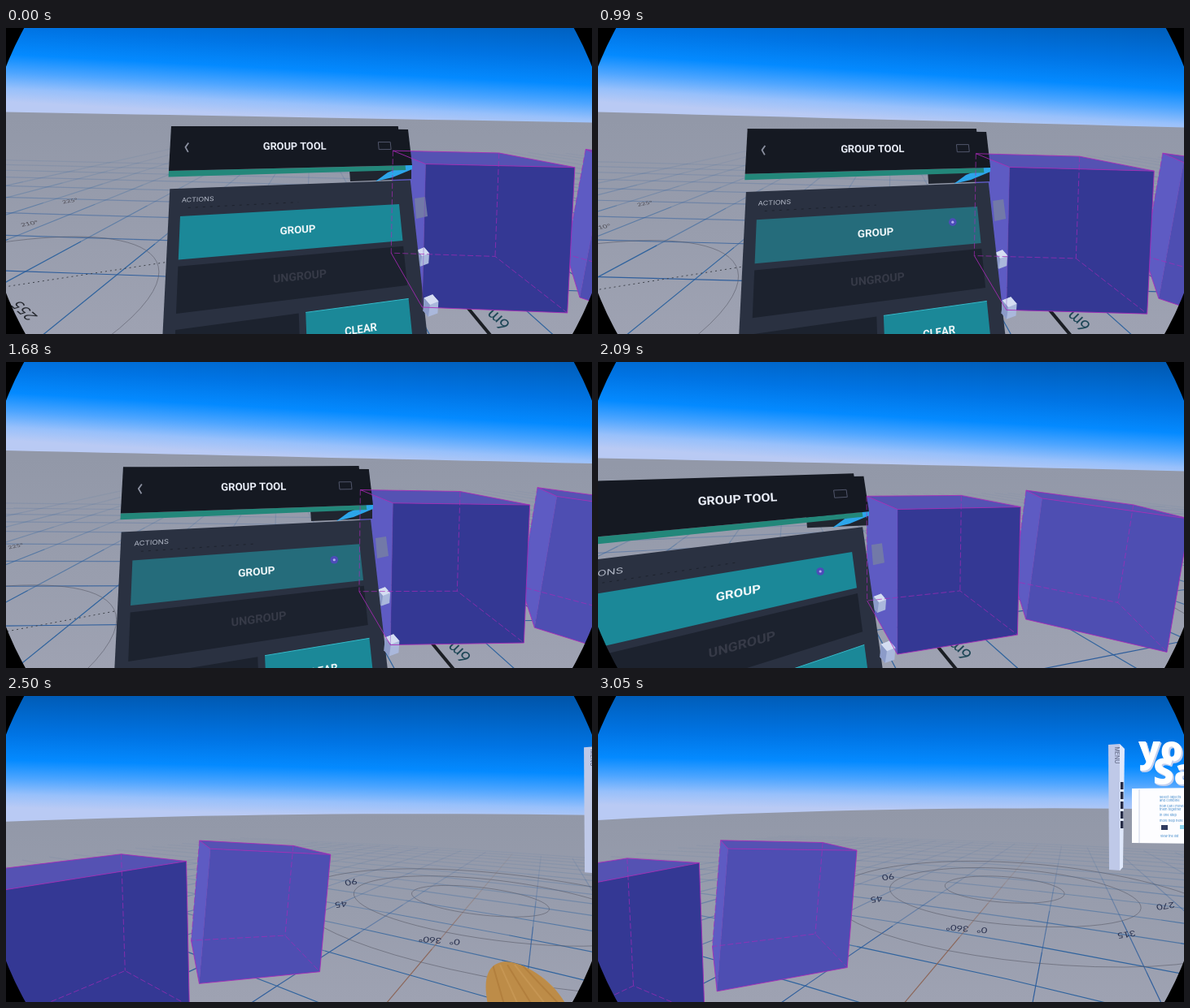
Recreate the animation shown at these times as an HTML page with a canvas. Size 720 by 377 pixels, loop 3.1 s.

```html
<!DOCTYPE html>
<html lang="en">
<head>
<meta charset="utf-8">
<title>Group tool</title>
<style>
html, body { margin: 0; width: 100%; height: 100%; overflow: hidden; background: #000; }
canvas { display: block; width: 720px; height: 377px; }
</style>
</head>
<body>
<canvas id="stage" width="720" height="377"></canvas>
<script>
const g = document.getElementById('stage').getContext('2d');
const LOOP = 3100, FOCAL = 410, EYE = 1.9, RAD = Math.PI / 180;

// camera path: time, near cube right and ahead of the eye, turn in degrees, horizon, tilt
const PATH = [
  [0, 1.415, 2.77, -2, 110, 13],
  [400, 1.41, 2.778, -1.4, 107, 14],
  [990, 1.345, 2.795, 0, 113, 19],
  [1680, 1.145, 2.843, 3.7, 117, 16],
  [2090, 0.395, 2.893, 17.4, 126, 16],
  [2500, -1.459, 2.167, 53.5, 146, -8],
  [3050, -1.911, 1.941, 62, 140, -13]
];
// boxes stand on the floor plan; units are one cube height
const NEAR = { x: 0, z: 0, turn: 0, top: 0.31, lean: 0 };
const FAR = { x: 1.43, z: -0.3, turn: -32, top: 0.25, lean: 0.1 };
const GRID = 1.11, HUB = [7.5, -1.18];
const HEAD = [[203, 122], [494, 126], [499, 170], [200, 177]];
const BODY = [[214, 233], [483, 218], [493, 318], [209, 353]];

const clamp = (v, a, b) => Math.max(a, Math.min(b, v));

// monotone cubic through the path
function pose(t) {
  const n = PATH.length - 1;
  if (t >= PATH[n][0]) return PATH[n];
  let k = 0;
  while (t >= PATH[k + 1][0]) k++;
  const step = i => PATH[i + 1][0] - PATH[i][0];
  const h = step(k), s = (t - PATH[k][0]) / h, r = 1 - s;
  return PATH[k].map((p, j) => {
    const rate = i => (PATH[i + 1][j] - PATH[i][j]) / step(i);
    const slope = i => {
      if (i === 0) return rate(0);
      if (i === n) return rate(n - 1);
      const a = rate(i - 1), b = rate(i);
      return a * b <= 0 ? 0 : 2 * a * b / (a + b);
    };
    const q = PATH[k + 1][j];
    return r * r * (1 + 2 * s) * p + s * s * (3 - 2 * s) * q
      + h * s * r * (r * slope(k) - s * slope(k + 1));
  });
}

function spin(x, z, deg) {
  const c = Math.cos(deg * RAD), s = Math.sin(deg * RAD);
  return [x * c - z * s, x * s + z * c];
}

function makeView(t) {
  const [, ox, oz, turn, mid, tilt] = pose(t);
  const bend = 6 * (turn / 60) ** 2;
  const horizon = x => {
    const k = clamp(x, -300, 1020) / 360 - 1;
    return mid + tilt * k / 2 + bend * k * k;
  };
  const toEye = (x, z) => {
    const p = spin(x, z, turn);
    return [p[0] + ox, p[1] + oz];
  };
  const shoot = ([x, z], drop = EYE) => {
    const px = 360 + FOCAL * x / z;
    return [px, horizon(px) + FOCAL * drop / z];
  };
  return { turn, mid, tilt, horizon, toEye, shoot };
}

function trace(pts, close) {
  g.beginPath();
  pts.forEach(p => g.lineTo(p[0], p[1]));
  if (close) g.closePath();
}
function fill(pts, color) {
  trace(pts, true);
  g.fillStyle = color;
  g.fill();
}
function stroke(pts, color, width, close) {
  trace(pts, close);
  g.strokeStyle = color;
  g.lineWidth = width;
  g.stroke();
}
function disc(x, y, r, color) {
  g.beginPath();
  g.arc(x, y, r, 0, 7);
  g.fillStyle = color;
  g.fill();
}
function write(str, x, y, font, color, angle = 0, squash = 1) {
  g.save();
  g.translate(x, y);
  g.scale(1, squash);
  g.rotate(angle);
  g.font = font;
  g.fillStyle = color;
  g.fillText(str, 0, 0);
  g.restore();
}

function drawSky({ mid, tilt }) {
  const k = tilt / 720 + 0.035;
  const sky = g.createLinearGradient(360, mid, 360 + 150 * k, mid - 150);
  [[0, '#b9caf4'], [0.11, '#97c0fb'], [0.24, '#4da5ff'], [0.39, '#048aff'], [0.6, '#0074e4'], [1, '#0056ac']]
    .forEach(s => sky.addColorStop(...s));
  g.fillStyle = sky;
  g.fillRect(0, 0, 720, 377);
}

function floorLine(view, a, b, color, width) {
  let p = view.toEye(...a), q = view.toEye(...b);
  const near = 0.5;
  if (p[1] > q[1]) [p, q] = [q, p];
  if (q[1] < near) return;
  if (p[1] < near) {
    const k = (near - p[1]) / (q[1] - p[1]);
    p = [p[0] + (q[0] - p[0]) * k, near];
  }
  g.globalAlpha = Math.min(0.95, 18 / ((p[1] + q[1]) / 2) ** 2);
  stroke([view.shoot(p), view.shoot(q)], color, width);
  g.globalAlpha = 1;
}

function floorRing(view, [cx, cz], rad) {
  g.beginPath();
  let pen = false;
  for (let a = 0; a <= 360; a += 5) {
    const [dx, dz] = spin(rad, 0, a), p = view.toEye(cx + dx, cz + dz);
    const seen = p[1] > 0.6;
    if (seen) g[pen ? 'lineTo' : 'moveTo'](...view.shoot(p));
    pen = seen;
  }
  g.strokeStyle = 'rgba(90,92,105,.6)';
  g.lineWidth = 1;
  g.stroke();
}

function floorText(view, str, x, z, size, color, angle, squash) {
  const p = view.toEye(x, z);
  if (p[1] > 1) write(str, ...view.shoot(p), `${size}px Lato, sans-serif`, color, angle, squash);
}

function drawFloor(view) {
  const shade = g.createLinearGradient(0, view.mid, 0, 377);
  shade.addColorStop(0, '#9298a8');
  shade.addColorStop(1, '#9ea2b2');
  const edge = [[720, 377], [0, 377]];
  for (let x = 0; x <= 720; x += 40) edge.push([x, view.horizon(x)]);
  fill(edge, shade);

  for (let i = -15; i <= 10; i++) {
    const x = HUB[0] + i * GRID, z = HUB[1] + i * GRID;
    for (let j = -16; j < 18; j += 2) {
      floorLine(view, [x, j], [x, j + 2], '#2a609d', 1.2);
      floorLine(view, [j, z], [j + 2, z], i ? '#2a5b9b' : '#8c6455', 1.2);
    }
  }
  for (let k = 1; k <= 3; k++) floorRing(view, HUB, k * 1.34);
  floorRing(view, [-4.78, 0.39], 1.8);
  g.setLineDash([2, 4]);
  floorLine(view, [-4.6, 0.7], [-2.6, 1.7], '#3c4048', 1);
  g.setLineDash([]);

  for (let k = -2; k <= 2; k++) {
    const [dx, dz] = spin(-3.1, 0, k * 45);
    const str = k ? String(k > 0 ? 360 - 45 * k : -45 * k) : '0°   360°';
    floorText(view, str, HUB[0] + dx, HUB[1] + dz, 13, '#28304e', k ? 2.95 : 3.25, 0.75);
  }
  floorText(view, '225°', -6.5, 4.2, 9, '#4c4a52', -0.3, 0.6);
  floorText(view, '210°', -6.1, 2.7, 10, '#4c4a52', -0.3, 0.6);
  floorText(view, '255', -4.05, 0.28, 22, '#25282f', -2.2, 0.65);

  floorLine(view, [0.27, -0.4], [0.27, 1.2], '#15181d', 4);
  floorText(view, '6m', 0.47, 0.43, 22, '#1d4656', -2.4, 0.9);
}

function boxCorners(view, box) {
  const at = (sx, sz, y) => {
    const lx = sx * 0.51, [dx, dz] = spin(lx - box.lean * y, sz * 0.465, box.turn);
    const p = view.shoot(view.toEye(box.x + dx, box.z + dz), box.top + y + box.lean * (lx + 0.5));
    p[0] -= (p[0] - 360) * 0.00015 * (p[1] - view.mid);
    return p;
  };
  const ring = y => [at(-1, -1, y), at(1, -1, y), at(1, 1, y), at(-1, 1, y)];
  return { top: ring(0), low: ring(1) };
}
function drawBox({ top, low }, front) {
  fill([top[3], top[0], low[0], low[3]], '#5e5bc3');
  fill(top, '#5552b3');
  fill([top[0], top[1], low[1], low[0]], front);
}
function drawEdges({ top, low }) {
  const pink = 'rgba(170,40,184,.85)';
  stroke([top[1], low[1], low[0], low[3]], pink, 1);
  stroke(top, pink, 1, true);
  stroke([top[0], low[0]], 'rgba(120,60,190,.4)', 1);
  g.setLineDash([7, 3]);
  stroke([top[3], low[3], low[2], low[1]], pink, 0.8);
  stroke([top[2], low[2]], pink, 0.8);
  g.setLineDash([]);
}

// the panel slides with the turn; its left side swings closer
function panelWarp({ turn, mid }) {
  const d = turn + 2, swing = 0.8 * d + 0.185 * d * d;
  const slide = 8.45 * d + 0.0006 * d ** 3;
  return ([x, y]) => {
    const w = swing * (490 - x) / 285;
    return [x - slide - w, y + mid - 111 + w * (y - 86) / 280];
  };
}

// unit square to quad
function plane([[x0, y0], [x1, y1], [x2, y2], [x3, y3]]) {
  const sx = x0 - x1 + x2 - x3, sy = y0 - y1 + y2 - y3;
  const ax = x1 - x2, ay = y1 - y2, bx = x3 - x2, by = y3 - y2;
  const d = ax * by - bx * ay;
  const m = (sx * by - bx * sy) / d, n = (ax * sy - sx * ay) / d;
  return (u, v) => {
    const w = 1 + m * u + n * v;
    return [
      (x0 + (x1 - x0 + m * x1) * u + (x3 - x0 + n * x3) * v) / w,
      (y0 + (y1 - y0 + m * y1) * u + (y3 - y0 + n * y3) * v) / w
    ];
  };
}
function area(map, u0, v0, u1, v1, color) {
  fill([map(u0, v0), map(u1, v0), map(u1, v1), map(u0, v1)], color);
}
function label(map, str, u, v, [w, h], font, color, align = 'center') {
  const p = map(u, v), a = map(u + 0.01, v), b = map(u, v + 0.01);
  const kx = 100 / w, ky = 100 / h;
  g.save();
  g.transform((a[0] - p[0]) * kx, (a[1] - p[1]) * kx, (b[0] - p[0]) * ky, (b[1] - p[1]) * ky, p[0], p[1]);
  g.font = font;
  g.textAlign = align;
  g.fillStyle = color;
  g.fillText(str, 0, 0);
  g.restore();
}

function drawGem(x, y, s) {
  const at = pts => pts.map(([u, v]) => [x + u * s, y + v * s]);
  fill(at([[-8, -9], [2, -13], [9, -5], [8, 9], [-3, 13], [-9, 6]]), '#aab8dc');
  fill(at([[-8, -9], [2, -13], [9, -5], [-1, -1]]), '#d5ddf2');
  fill(at([[-8, -9], [-1, -1], [-3, 13], [-9, 6]]), '#8c9bc9');
}

function drawPanel(warp, t) {
  const corners = HEAD.map(warp), head = plane(corners), body = plane(BODY.map(warp));
  const [rx, ry] = corners[2];
  const near = pts => pts.map(([x, y]) => [rx + x, ry + y]);
  const bold = size => `bold ${size}px Roboto, sans-serif`;
  const dark = '#1c222e', teal = '#1b8898', ink = '#151922', size = [269, 110];

  fill(near([[3, 41], [16, 39], [19, 63], [5, 66]]), 'rgba(116,124,165,.9)');
  drawGem(rx + 13, ry + 113, 0.9);
  fill(near([[-77, 6], [-1, 1], [-1, 17], [-76, 20]]), '#20252f');
  fill(near([[-45, 20], [-30, 9], [0, -3], [0, 5], [-24, 15]]), '#2ca5ea');

  area(body, -0.045, -0.31, 1.075, 2, '#2a3141');
  area(body, 0, 0, 1, 0.462, t > 600 && t < 2000 ? '#256c7b' : teal);
  area(body, 0, 0.53, 1, 1, dark);
  area(body, 0, 1.155, 0.485, 1.65, dark);
  area(body, 0.515, 1.155, 1, 1.65, teal);
  stroke([body(0.515, 1.155), body(1, 1.155)], '#35b9c9', 1);
  g.setLineDash([3, 6]);
  stroke([body(0.03, -0.09), body(0.5, -0.09)], '#1d222d', 1);
  g.setLineDash([]);
  label(body, 'ACTIONS', 0.003, -0.175, size, '7.7px Inter, sans-serif', '#b4bac8', 'left');
  label(body, 'GROUP', 0.493, 0.24, size, bold(13.2), '#eef6f8');
  label(body, 'UNGROUP', 0.495, 0.765, size, bold(13.6), '#363a47');
  label(body, 'CLEAR', 0.757, 1.42, size, bold(13.2), '#eef6f8');

  area(head, 0, 1, 0.965, 1.13, '#23877a');
  area(head, 0, 0, 1, 1, ink);
  fill([head(0, 0), head(0.95, -0.09), head(0.95, 0.02), head(0, 0.02)], ink);
  label(head, 'GROUP TOOL', 0.464, 0.475, [290, 48], bold(12.5), '#e8ecf6');
  stroke([head(0.062, 0.38), head(0.052, 0.48), head(0.062, 0.59)], '#8b90a0', 1.8);
  stroke([head(0.842, 0.36), head(0.902, 0.36), head(0.902, 0.56), head(0.842, 0.56)], '#50556a', 1, true);
  drawGem(rx + 23, ry + 173, 1.05);
}

function drawDot(warp, t) {
  if (t < 250) return;
  const k = clamp((t - 400) / 590, 0, 1), s = k * k * (3 - 2 * k);
  const [x, y] = warp([464 - 11 * s, 211 + 26 * s]);
  disc(x, y, 4.8, '#4d4cb8');
  disc(x, y, 1.6, '#b3aef0');
}

function drawSign({ turn }) {
  const dx = (62 - turn) * 9.8;
  if (dx > 110) return;
  g.save();
  g.translate(dx, dx * 0.04);
  fill([[627, 60], [641, 59], [642, 215], [628, 214]], '#bfc9e8');
  fill([[641, 59], [647, 65], [645, 211], [641, 215]], '#dfe8fb');
  for (let y = 106; y < 166; y += 12) fill([[642, y], [645.5, y], [645.5, y + 9], [642, y + 9]], '#262c46');
  write('MENU', 637, 73, '7px Inter, sans-serif', '#5a617c', Math.PI / 2);
  g.textAlign = 'left';
  [['yo', 664, 70], ['Sa', 682, 98]].forEach(([s, x, y]) => {
    for (let i = 3; i >= 0; i--) write(s, x + i * 0.6, y + i * 0.5, '800 44px "Open Sans", sans-serif', i ? '#c3d0ef' : '#fff');
  });
  fill([[656, 114], [740, 113], [740, 182], [656, 181]], '#fdfdff');
  stroke([[665, 115], [665, 181]], '#cfd6e8', 1);
  ['select objects', 'and combine', '', 'how can I move', 'them together', '', 'in one step', '', 'more help here']
    .forEach((s, i) => write(s, 690, 125 + i * 3.6, '4px Inter, sans-serif', '#3d87c9'));
  fill([[692, 159], [700, 159], [700, 165], [692, 165]], '#303c60');
  fill([[715, 159], [720, 159], [720, 164], [715, 164]], '#8dd5ee');
  write('view the list', 691, 173, '4px Inter, sans-serif', '#3d87c9');
  g.restore();
}

function drawStick(t) {
  const dy = Math.abs(t - 2500) * 0.2;
  if (dy > 55) return;
  g.save();
  g.translate(dy * 0.3, dy);
  g.beginPath();
  g.moveTo(592, 380);
  g.bezierCurveTo(586, 350, 590, 330, 612, 327);
  g.bezierCurveTo(635, 326, 672, 350, 688, 380);
  g.fillStyle = '#bd8c48';
  g.fill();
  g.clip();
  for (let i = 0; i < 6; i++) stroke([[598 + i * 9, 331], [612 + i * 17, 380]], i % 2 ? '#c69653' : '#b27f3d', 2);
  g.restore();
}

function draw(t) {
  const view = makeView(t), warp = panelWarp(view);
  const far = boxCorners(view, FAR), near = boxCorners(view, NEAR);
  g.textBaseline = 'middle';
  g.textAlign = 'center';
  g.lineJoin = 'round';
  drawSky(view);
  drawFloor(view);
  drawSign(view);
  drawBox(far, '#4e4eb2');
  drawEdges(far);
  drawBox(near, '#343894');
  if (view.turn < 50) drawPanel(warp, t);
  drawEdges(near);
  if (view.turn < 50) drawDot(warp, t);
  drawStick(t);
  g.beginPath();
  g.rect(0, 0, 720, 377);
  g.arc(360, 187, 386, 0, Math.PI * 2);
  g.fillStyle = '#000';
  g.fill('evenodd');
}

const start = performance.now();
function tick() {
  draw((performance.now() - start) % LOOP);
  requestAnimationFrame(tick);
}
tick();
</script>
</body>
</html>
```
